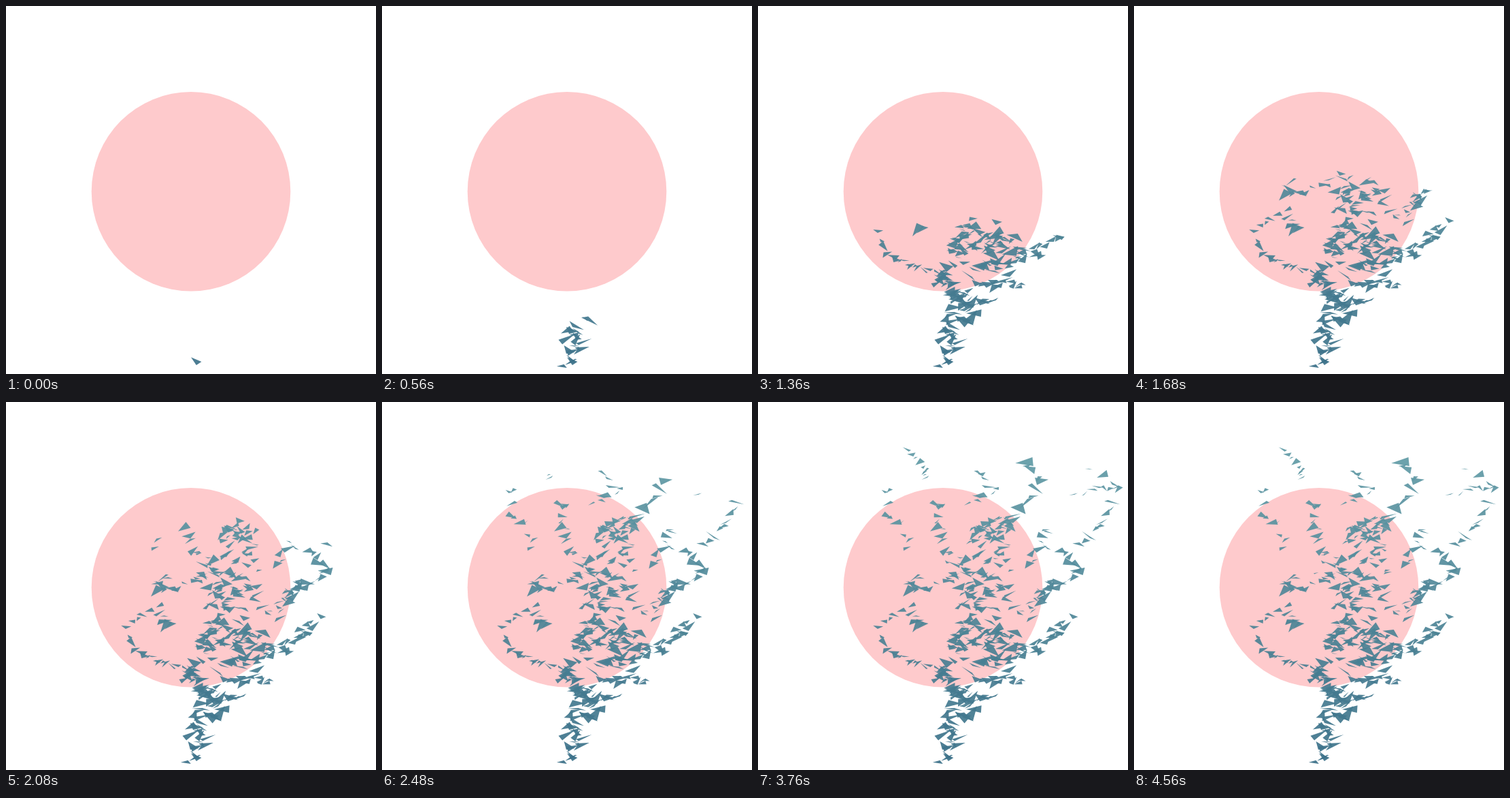
Write an HTML page with a canvas that moves like this. It is 544 px wide and 540 px high and loops after 4640 ms.

```html
<!DOCTYPE html>
<html lang="en">
<head>
<meta charset="utf-8">
<title>Shard tree</title>
<style>
  html, body { margin: 0; width: 100%; height: 100%; overflow: hidden; background: #fff; }
  canvas { display: block; }
</style>
</head>
<body>
<canvas id="stage" width="544" height="540"></canvas>
<script>
const ctx = document.getElementById('stage').getContext('2d');
const LOOP = 4640, STEP = 80, FIRST = 240, GROUND = 531;
const shards = [];

let seed = 41;
function rand() {
  seed = (seed * 16807) % 2147483647;
  return seed / 2147483647;
}
const between = (a, b) => a + (b - a) * rand();

// Deep blue at the trunk, paler towards the crown.
function shade(y) {
  const k = Math.min(1, Math.max(0, (GROUND - y) / 470));
  const mix = (a, b) => Math.round(a + (b - a) * k);
  return `rgba(${mix(60, 98)},${mix(113, 156)},${mix(137, 167)},.92)`;
}

// The tree climbs at a steady pace and reaches its sides a little later.
function birthAt(x, y) {
  const t = 150 + (GROUND - y) * 5.2 + Math.abs(x - 300) * 1.2 + between(0, 120);
  return t < FIRST ? 0 : t;
}

// A thin triangle leaning up to the right or, less often, down to the right.
function addShard(x, y, size, birth = birthAt(x, y)) {
  const lean = rand() < 0.55 ? between(-42, -8) : between(0, 38);
  const a = lean * Math.PI / 180, c = Math.cos(a), s = Math.sin(a);
  const len = size * between(0.5, 1.3);
  const h = len * between(0.08, 0.55) * (rand() < 0.5 ? 1 : -1);
  const tip = between(-0.4, 0.4) * len;
  const points = [[-len / 2, -h / 2], [len / 2, -h / 2], [tip, h / 2]]
    .map(([u, v]) => [x + u * c - v * s, Math.min(GROUND, y + u * s + v * c)]);
  shards.push({ birth, points, color: shade(y) });
}

// Strews n shards around a polyline, spread pixels to either side.
function branch(n, size, spread, ...path) {
  for (let i = 0; i < n; i++) {
    const u = (i + rand()) / n * (path.length - 1), k = Math.floor(u);
    const [[x0, y0], [x1, y1]] = [path[k], path[k + 1]];
    const a = rand() * Math.PI * 2, r = Math.sqrt(rand()) * spread;
    addShard(
      x0 + (x1 - x0) * (u - k) + Math.cos(a) * r,
      y0 + (y1 - y0) * (u - k) + Math.sin(a) * r * 0.7,
      size
    );
  }
}

// Trunk
branch(9, 15, 9, [274, 527], [284, 498]);
branch(34, 21, 20, [284, 494], [300, 455], [303, 425]);
branch(7, 19, 6, [310, 430], [350, 436]);

// Lower boughs
branch(32, 18, 16, [300, 425], [270, 402], [284, 388]);
branch(16, 17, 10, [330, 408], [390, 408]);
branch(10, 15, 4, [250, 388], [195, 368]);
branch(40, 21, 28, [330, 395], [372, 365], [350, 335]);
branch(18, 19, 16, [290, 375], [304, 320]);

// Heart of the crown
branch(64, 17, 34, [318, 345], [325, 285], [305, 235]);
branch(34, 17, 26, [375, 345], [350, 250], [340, 195]);
branch(26, 16, 20, [325, 200], [370, 170]);

// Left twigs
branch(9, 15, 5, [190, 365], [177, 325], [230, 294]);
branch(6, 21, 6, [242, 330], [222, 310]);
branch(13, 18, 7, [285, 262], [250, 276], [212, 271], [240, 250]);
branch(12, 17, 7, [285, 230], [266, 185], [268, 140]);
branch(10, 15, 5, [225, 225], [212, 180], [185, 160], [190, 120]);
branch(9, 12, 3, [245, 113], [246, 95], [213, 68]);

// Right twigs
branch(16, 17, 9, [395, 375], [428, 345], [461, 317]);
branch(22, 17, 12, [405, 310], [422, 272], [440, 272]);
branch(11, 19, 5, [440, 272], [474, 245], [440, 215]);
branch(9, 18, 7, [395, 235], [418, 217], [424, 182]);
branch(9, 19, 3, [470, 212], [505, 180], [524, 145]);
branch(11, 16, 4, [460, 138], [505, 126], [532, 128], [487, 96]);

// Top twigs
branch(10, 22, 5, [375, 165], [418, 122], [388, 82]);
branch(10, 18, 7, [310, 148], [345, 130], [322, 100]);

// Last stray shards inside the crown
for (let birth = 3040; birth < LOOP - STEP; birth += 2 * STEP) {
  addShard(between(265, 380), between(150, 370), 11, birth);
}

function draw(time) {
  ctx.fillStyle = '#fff';
  ctx.fillRect(0, 0, 544, 540);
  ctx.fillStyle = '#fecacc';
  ctx.beginPath();
  ctx.arc(272, 272.3, 146.3, 0, Math.PI * 2);
  ctx.fill();
  for (const { birth, points, color } of shards) {
    if (birth > time) continue;
    ctx.fillStyle = color;
    ctx.beginPath();
    points.forEach(p => ctx.lineTo(...p));
    ctx.fill();
  }
}

const start = performance.now();
function frame() {
  const t = (performance.now() - start) % LOOP;
  draw(Math.floor(t / STEP) * STEP);
  requestAnimationFrame(frame);
}
frame();
</script>
</body>
</html>
```
